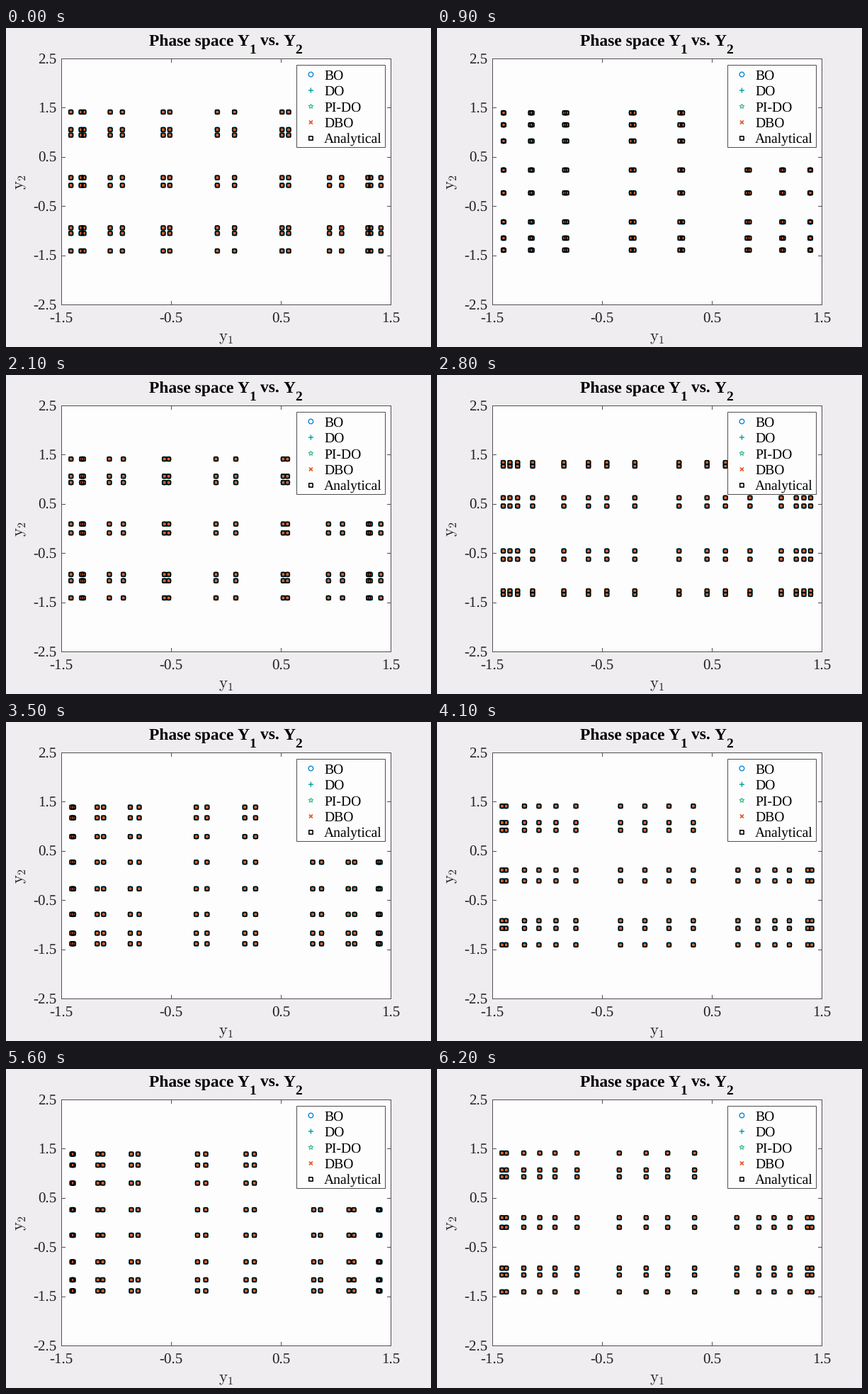
A matplotlib script for the animation above (6.3 s loop, 600x450 px).

```python
import numpy as np
import matplotlib.pyplot as plt
from matplotlib.animation import FuncAnimation
from matplotlib.patches import Rectangle

W, H, DPI = 600, 450, 100
PX = 72 / DPI                      # points per pixel
LEFT, RIGHT, TOP, BOTTOM = 78, 543, 43, 390
INK, EDGE = "#222222", "#505050"

FRAMES, INTERVAL = 63, 100
PHASE, STEP, OFFSET = 0.0555, 0.15, np.pi / 10

plt.rcParams["mathtext.fontset"] = "cm"
plt.rcParams["text.hinting"] = "none"
plt.rcParams["path.simplify"] = False
fig = plt.figure(figsize=(W / DPI, H / DPI), dpi=DPI, facecolor="#efedef")
ax = fig.add_axes([0, 0, 1, 1])
ax.set_xlim(0, W)
ax.set_ylim(H, 0)
ax.axis("off")

GAP = [np.nan, np.nan]


def ring(n, radii, turn=0):
    """Closed outline of n corners; radii repeat around it."""
    i = np.arange(n + 1)
    r = np.resize(radii, n)[i % n]
    a = turn + i * 2 * np.pi / n
    return np.column_stack([r * np.sin(a), -r * np.cos(a)])


def cross(r, turn=0):
    c, s = r * np.cos(turn), r * np.sin(turn)
    return np.array([[-c, -s], [c, s], GAP, [s, -c], [-s, c]])


# label, outline in pixels, colour, line width in pixels
SERIES = [
    ("BO", ring(24, [3.3]), "#0f88cf", 1.4),
    ("DO", cross(3.6), "#12a9a9", 1.5),
    ("PI-DO", ring(10, [3.4, 1.5]), "#4cc08f", 1.3),
    ("DBO", cross(3.5, np.pi / 4), "#e2602c", 1.8),
    ("Analytical", ring(4, [3.8], np.pi / 4), "black", 1.6),
]


def stamp(outline, x, y):
    """Copies of an outline at every point, as one broken line."""
    shape = np.vstack([outline, GAP])
    points = np.column_stack([x, y])
    return (points[:, None, :] + shape).reshape(-1, 2).T


def to_x(v):
    return LEFT + (v + 1.5) / 3 * (RIGHT - LEFT)


def to_y(v):
    return TOP + (2.5 - v) / 5 * (BOTTOM - TOP)


def write(x, y, s, size, color=INK, **kw):
    kw = {"family": "Liberation Serif", "va": "baseline", **kw}
    return ax.text(x, y, s, fontsize=size * PX, color=color, **kw)


def line(x, y):
    ax.plot(x, y, color=EDGE, lw=PX, zorder=2)


def markers(spec, x, y, z):
    _, outline, color, width = spec
    return ax.plot(*stamp(outline, x, y), color=color, lw=width * PX,
                   solid_joinstyle="round", solid_capstyle="butt",
                   snap=False, zorder=z)[0]


def box(x0, y0, x1, y1, z):
    ax.add_patch(Rectangle((x0, y0), x1 - x0, y1 - y0, fc="#fdfdfe", ec=EDGE,
                           lw=PX, zorder=z))


def draw_axes():
    box(LEFT, TOP, RIGHT, BOTTOM, 1)
    for v in (-1.5, -0.5, 0.5, 1.5):
        x = to_x(v)
        line([x, x], [BOTTOM, BOTTOM - 4.7])
        line([x, x], [TOP, TOP + 4.7])
        write(x, 415.5, f"{v}", 21, ha="center")
    for v in np.arange(-2.5, 3):
        y = to_y(v)
        line([LEFT, LEFT + 4.7], [y, y])
        line([RIGHT, RIGHT - 4.7], [y, y])
        write(71.3, y + 7.3, f"{v}", 21, ha="right")
    write(300, 441, r"$\mathrm{y}_1$", 22.7)
    write(24.8, 227.5, r"$\mathrm{y}_2$", 22.7, rotation=90,
          rotation_mode="anchor")


def draw_title():
    for x, word in ((201.5, "Phase space"), (326.6, "Y"), (359.3, "vs."),
                    (391.8, "Y")):
        write(x, 25, word, 23.5, "black", weight="bold")
    for x, digit in ((343.6, "1"), (408.5, "2")):
        write(x, 36.3, digit, 19.5, "black", weight="bold")


def draw_legend():
    box(410, 52, 535, 168, 20)
    for i, spec in enumerate(SERIES):
        y = 65.5 + 22.5 * i
        markers(spec, [430.4], [y], 21)
        write(449.3, y + 7.2, spec[0], 19.6, "black", zorder=21)


draw_axes()
draw_title()
draw_legend()
clouds = [markers(spec, [], [], 5 + i) for i, spec in enumerate(SERIES)]

SPOKES = np.arange(8) * np.pi / 4


def update(frame):
    a = PHASE + STEP * frame
    y1 = np.sqrt(2) * np.cos(np.concatenate([a + SPOKES, a + OFFSET + SPOKES]))
    y2 = np.sqrt(2) * np.cos(a + SPOKES)
    x, y = np.meshgrid(to_x(y1), to_y(y2))
    for cloud, (_, outline, *_) in zip(clouds, SERIES):
        cloud.set_data(*stamp(outline, x.ravel(), y.ravel()))
    return clouds


anim = FuncAnimation(fig, update, frames=FRAMES, interval=INTERVAL,
                     repeat=True, repeat_delay=0, blit=False)
plt.show()
```
